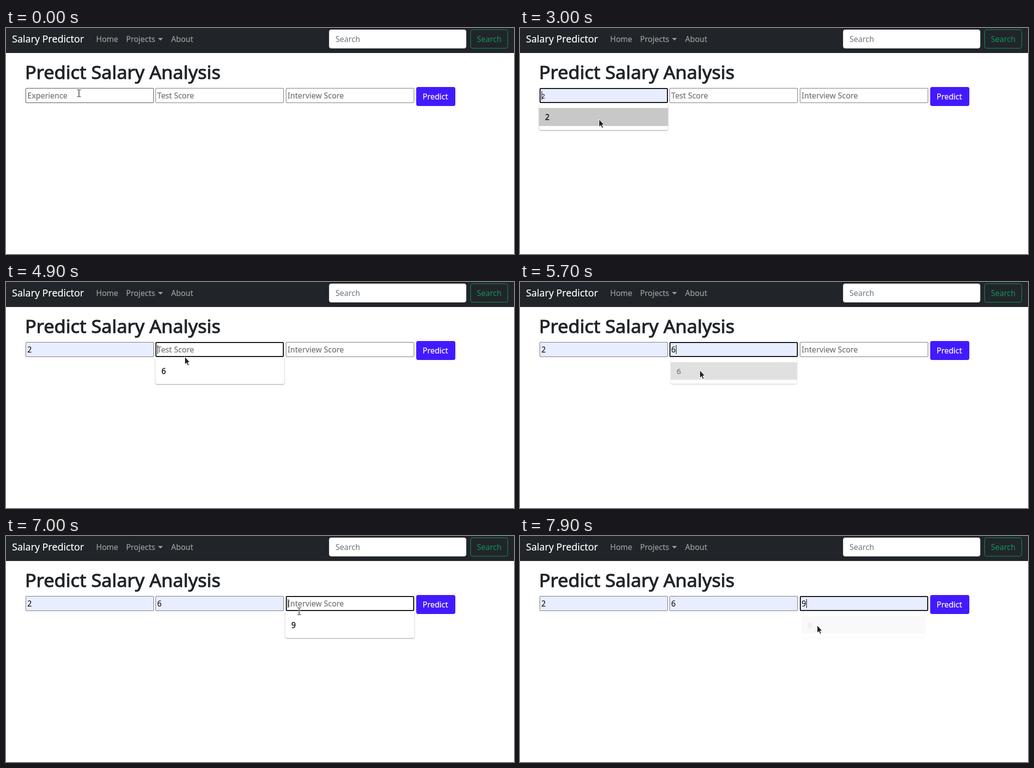
An HTML page for the animation above (8 s loop, 1013 px wide and 452 px high).

```html
<!DOCTYPE html>
<html lang="en">
<head>
<meta charset="utf-8">
<title>Salary form</title>
<style>
  html, body { margin: 0; width: 100%; height: 100%; overflow: hidden; background: #fff; }
  svg { display: block; width: 1013px; height: 452px; font: 15.5px "Noto Sans", sans-serif; }
  .brand { font-size: 19.4px; fill: #fff; stroke: #fff; stroke-width: .2; }
  .link { fill: #9b9d9f; stroke: #9b9d9f; stroke-width: .2; }
  .title { font-size: 37.3px; fill: #212529; stroke: #212529; stroke-width: 1.1; }
  .hint { fill: #757575; stroke: #757575; stroke-width: .2; }
  .item { fill: #202124; stroke: #202124; stroke-width: .5; }
  .popup .panel { fill: #fff; filter: drop-shadow(0 1.5px 1.2px rgba(0, 0, 0, .4)); }
</style>
</head>
<body>
<svg viewBox="0 0 1013 452">
  <rect width="1013" height="50" fill="#212529"/>
  <text class="brand" x="12" y="29">Salary Predictor</text>
  <g class="link">
    <text x="179.7" y="28">Home</text>
    <text x="239.4" y="28">Projects</text>
    <path d="M303 20h10l-5 5z" stroke="none"/>
    <text x="329.3" y="28">About</text>
  </g>
  <rect x="644.5" y="3.5" width="273" height="37" rx="4" fill="#fff" stroke="#ced4da"/>
  <text x="657" y="28" fill="#6c757d">Search</text>
  <rect x="926.5" y="3.5" width="74" height="37" rx="4" fill="none" stroke="#12935a"/>
  <text x="939" y="28" fill="#12935a">Search</text>

  <text class="title" x="38" y="102">Predict Salary Analysis</text>
  <g id="form"></g>
  <rect x="818" y="118" width="78" height="38" rx="4" fill="#431aff"/>
  <text x="830.8" y="143" fill="#fff" stroke="#fff" stroke-width=".2">Predict</text>
  <g id="popups"></g>

  <g id="beam" fill="none">
    <path d="M-3 -6.5H4M-3 7.5H4M.5 -6.5V7.5" stroke="#fff" stroke-width="2.6"/>
    <path d="M-3 -6.5H0M1 -6.5H4M-3 7.5H0M1 7.5H4M.5 -6V7" stroke="#111" stroke-width="1.2"/>
  </g>
  <path id="arrow" d="M.5 .5V16L4 12.8L6.5 18.2L9 17.1L6.6 11.8H11Z" fill="#222" stroke="#fff" stroke-width="1"/>
</svg>
<script>
const LOOP = 8000, STEP = 100;
const byId = id => document.getElementById(id);

// Times (ms): popup opens, field takes focus, row is highlighted, row is chosen.
const fields = [
  { x: 39, popupX: 38, hint: "Experience", value: "2", open: 1800, focus: 2300, hover: 2900, choose: 3600 },
  { x: 298, popupX: 298, hint: "Test Score", value: "6", open: 4500, focus: 4500, hover: 5100, choose: 5700 },
  { x: 558, popupX: 557, hint: "Interview Score", value: "9", open: 6700, focus: 6700, hover: 7200, choose: 7800 },
];

// Pointer path: time, x, y.
const path = [
  [0, 145, 130], [300, 144, 135], [2600, 144, 135], [3000, 157, 182],
  [3700, 157, 182], [4200, 353, 134], [4800, 353, 134], [4900, 356, 149],
  [5200, 358, 176], [5700, 358, 176], [6300, 581, 140], [6900, 581, 140],
  [7300, 592, 178], [LOOP, 592, 178],
];
const beamSpans = [[0, 2800], [4100, 4900], [6200, 7800]];

function add(parent, tag, attrs, text = "") {
  const node = document.createElementNS("http://www.w3.org/2000/svg", tag);
  set(node, attrs);
  node.textContent = text;
  return parent.appendChild(node);
}

function set(node, attrs) {
  for (const key in attrs) node.setAttribute(key, attrs[key]);
}

const show = (node, on) => set(node, { visibility: on ? "visible" : "hidden" });

for (const f of fields) {
  f.box = add(byId("form"), "rect", {});
  f.hintText = add(byId("form"), "text", { class: "hint", x: f.x + 3.6, y: 141 }, f.hint);
  f.valueText = add(byId("form"), "text", { x: f.x + 3.6, y: 141 }, f.value);
  f.caret = add(byId("form"), "rect", { y: 126, width: 1, height: 18 });
  f.popup = add(byId("popups"), "g", { class: "popup" });
  add(f.popup, "rect", { class: "panel", x: f.popupX, y: 152, width: 257, height: 52, rx: 3 });
  f.row = add(f.popup, "rect", { x: f.popupX, y: 160, width: 257, height: 36, fill: "#c8c8c8" });
  add(f.popup, "text", { class: "item", x: f.popupX + 12, y: 184 }, f.value);
}

function pointerAt(t) {
  const i = path.findIndex(([time]) => time > t);
  const [t0, x0, y0] = path[i - 1], [t1, x1, y1] = path[i];
  const k = (t - t0) / (t1 - t0);
  return { x: Math.round(x0 + (x1 - x0) * k), y: Math.round(y0 + (y1 - y0) * k) };
}

function drawField(f, i, t, pointer) {
  const next = fields[i + 1];
  const focused = t >= f.focus && (!next || t < next.focus);
  const filled = t >= f.hover, chosen = t >= f.choose;
  const hovered = pointer.x >= f.x && pointer.x < f.x + 256 && pointer.y >= 120 && pointer.y < 150;
  const line = focused ? 2 : 1;
  set(f.box, {
    x: f.x + line / 2, y: 120 + line / 2, width: 256 - line, height: 30 - line, rx: 1.5,
    fill: filled ? "#e8edff" : "#fff",
    stroke: focused ? "#101010" : hovered ? "#4f4f4f" : "#767676",
    "stroke-width": line,
  });
  show(f.hintText, !filled);
  show(f.valueText, filled);
  set(f.valueText, { "font-size": chosen ? 15.5 : 13 });

  const caretOn = t < f.choose - 100 || (chosen && t < f.choose + 500);
  show(f.caret, focused && caretOn);
  set(f.caret, { x: f.x + (chosen ? 13 : 4) });

  // The popup shrinks a little while it fades out.
  const closing = Math.max(0, (t - f.choose + 100) / 200);
  const centre = f.popupX + 128.5;
  show(f.popup, t >= f.open && closing <= 1);
  set(f.popup, {
    opacity: 1 - 0.9 * Math.min(1, closing),
    transform: `translate(${centre} 178) scale(${1 - 0.04 * closing}) translate(${-centre} -178)`,
  });
  set(f.row, { opacity: filled ? 1 : 0 });
}

function frame() {
  const t = Math.floor(performance.now() % LOOP / STEP) * STEP;
  const pointer = pointerAt(t);
  fields.forEach((f, i) => drawField(f, i, t, pointer));

  const isBeam = beamSpans.some(([from, to]) => t >= from && t < to);
  for (const id of ["beam", "arrow"]) {
    show(byId(id), (id === "beam") === isBeam);
    set(byId(id), { transform: `translate(${pointer.x} ${pointer.y})` });
  }
  requestAnimationFrame(frame);
}
frame();
</script>
</body>
</html>
```
